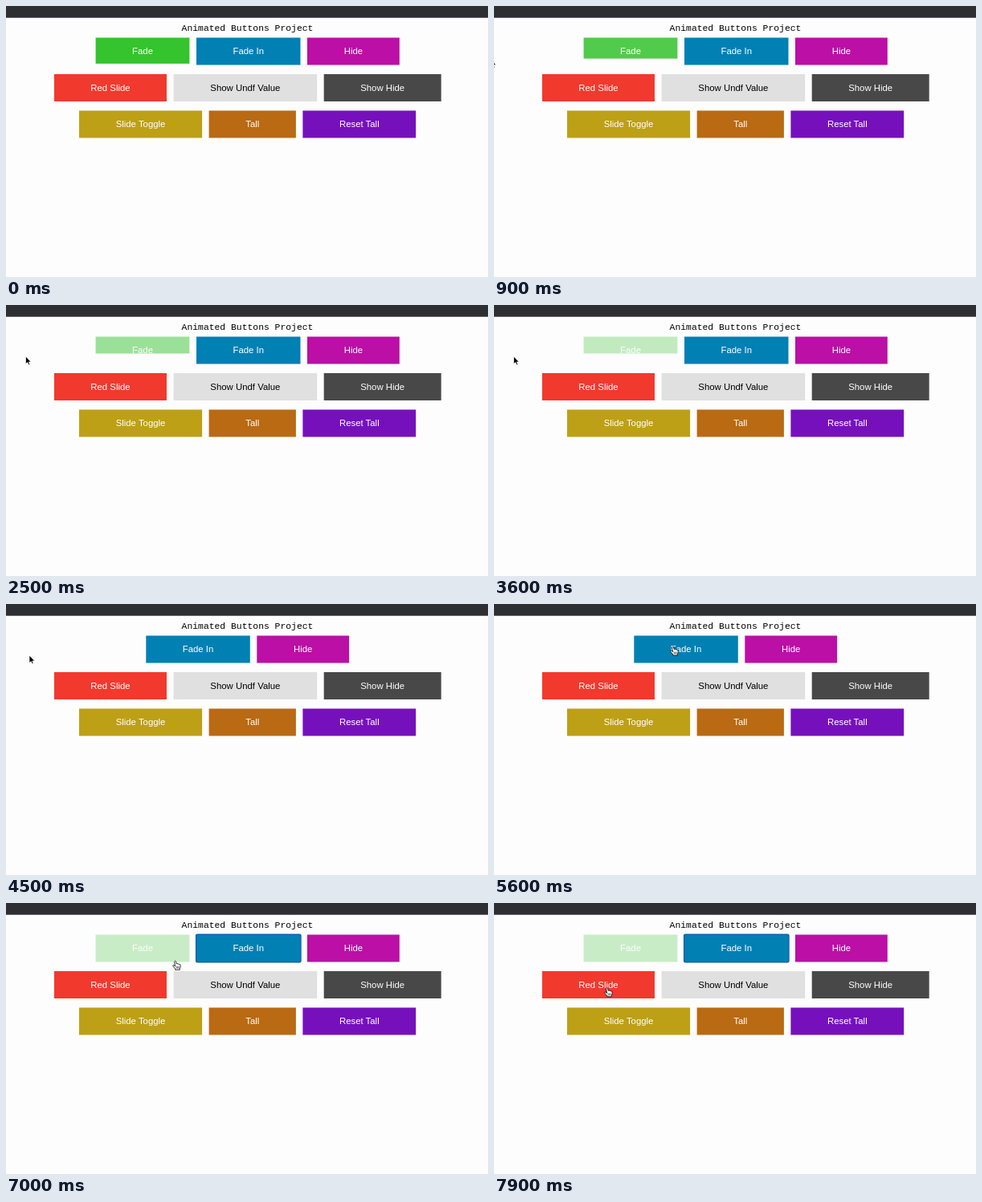
These frames come from a looping animation (600 px wide and 338 px high, 8 s). An HTML page:

```html
<!DOCTYPE html>
<html lang="en">
<head>
<meta charset="utf-8">
<title>Animated Buttons</title>
<style>
  html, body { margin: 0; width: 100%; height: 100%; overflow: hidden; background: #fdfdfd; }
  svg { display: block; width: 100%; height: 100%; }
  text { font: 11.38px "Liberation Sans", Arial, sans-serif; text-anchor: middle; }
  .title { font-family: "Liberation Mono", "Courier New", monospace; }
</style>
</head>
<body>
<svg viewBox="0 0 600 338">
  <rect width="600" height="14.7" fill="#2e2f33"/>
  <text class="title" x="300.5" y="31">Animated Buttons Project</text>
  <g id="buttons"></g>
  <rect id="ring" x="236.7" y="39.2" width="130.2" height="34.6" rx="1.5" fill="none" stroke="#0b62b0" stroke-width="1.6"/>
  <path id="arrow" d="M0 0V9.6L2.2 7.6L3.6 10.7L5.1 10L3.8 7.1H6.7Z" fill="#000" stroke="#fff" stroke-width=".7"/>
  <g id="hand" stroke="#000" stroke-width=".8" stroke-linejoin="round" stroke-linecap="round">
    <path fill="#fff" d="M-1.3 .6Q-.5 -.7 .4 .5L1.3 3.6Q2.3 2.8 3 3.8Q4 3.1 4.7 4.2Q6 3.8 6.1 5.4V8L5.3 9.5V11H-.3V9.8L-3.2 6.4Q-3.5 4.9 -2.2 5.2L-.6 6.4Z"/>
    <path fill="none" stroke-width=".6" d="M1.1 7V9.2M2.7 7V9.2M4.2 7V9.2"/>
  </g>
</svg>
<script>
const LOOP = 8000, STEP = 100, HEIGHT = 34, MIN_HEIGHT = 21;
const FADE_START = -700, FADE_TIME = 5000, FADE_END = FADE_START + FADE_TIME, DIM = 0.25;
const CLICK = 5900, FADE_IN_TIME = 400, SHIFT = -62.7;

// label, left, top, width, fill, text colour
const buttons = [
  ["Fade", 111.6, 39.5, 116.8, "#2ec127"],
  ["Fade In", 237, 39.5, 129.5, "#0180b4"],
  ["Hide", 375, 39.5, 114.8, "#bb0fa5"],
  ["Red Slide", 60, 85, 140, "#f1392e"],
  ["Show Undf Value", 208.6, 85, 178.6, "#e0e0e0", "#000"],
  ["Show Hide", 395.7, 85, 146, "#484848"],
  ["Slide Toggle", 91, 130.5, 153.1, "#bda016"],
  ["Tall", 252.6, 130.5, 108.3, "#b96a12"],
  ["Reset Tall", 369.4, 130.5, 140.8, "#7610bc"]
].map(([label, x, y, w, fill, ink = "#fff"]) => ({ label, x, y, w, fill, ink }));

// time, x, y of the pointer tip
const path = [
  [800, -8, 67], [1000, 0, 66], [1400, 24.5, 64], [4400, 24.5, 64], [4500, 29, 64],
  [5000, 125, 60], [5500, 223, 53], [6300, 223, 53], [6900, 211, 72.3],
  [7250, 211, 72.3], [7800, 141, 105.8], [8000, 141, 105.8]
];

const byId = id => document.getElementById(id);
const clamp = v => Math.min(1, Math.max(0, v));
const swing = p => 0.5 - Math.cos(clamp(p) * Math.PI) / 2;
const show = (el, on) => el.setAttribute("visibility", on ? "visible" : "hidden");

function add(parent, tag, attrs) {
  const el = document.createElementNS("http://www.w3.org/2000/svg", tag);
  for (const key in attrs) el.setAttribute(key, attrs[key]);
  return parent.appendChild(el);
}

for (const b of buttons) {
  b.group = add(byId("buttons"), "g", {});
  b.rect = add(b.group, "rect", { x: b.x, y: b.y, width: b.w, height: HEIGHT, fill: b.fill });
  add(b.group, "text", { x: b.x + b.w / 2, y: b.y + 20.5, fill: b.ink }).textContent = b.label;
}
const [fade, fadeIn, hide] = buttons;

function pointerAt(t) {
  const i = path.findIndex(k => k[0] > t);
  if (i < 1) return path[0].slice(1);
  const [t0, x0, y0] = path[i - 1], [t1, x1, y1] = path[i];
  const p = (t - t0) / (t1 - t0);
  return [x0 + (x1 - x0) * p, y0 + (y1 - y0) * p];
}

function draw(t) {
  const clicked = t >= CLICK, gone = t >= FADE_END && !clicked;
  const s = swing((t - FADE_START) / FADE_TIME);
  const opacity = clicked ? DIM * swing((t - CLICK) / FADE_IN_TIME) : 1 - (1 - DIM) * s;
  fade.group.setAttribute("opacity", opacity);
  fade.rect.setAttribute("height", clicked ? HEIGHT : Math.max(MIN_HEIGHT, HEIGHT * (1 - s)));
  show(fade.group, !gone);

  const shift = gone ? SHIFT : 0;
  for (const b of [fadeIn, hide]) b.group.setAttribute("transform", `translate(${shift})`);
  show(byId("ring"), clicked);

  const [x, y] = pointerAt(t);
  const over = buttons.some(b => {
    if (b === fade && gone) return false;
    const left = b.x + (b === fadeIn || b === hide ? shift : 0);
    return x >= left && x <= left + b.w && y >= b.y && y <= b.y + HEIGHT;
  });
  for (const id of ["arrow", "hand"]) {
    byId(id).setAttribute("transform", `translate(${x} ${y})`);
    show(byId(id), over === (id === "hand"));
  }
}

const start = performance.now();
function tick() {
  const t = (performance.now() - start) % LOOP;
  draw(Math.floor(t / STEP) * STEP);
  requestAnimationFrame(tick);
}
tick();
</script>
</body>
</html>
```
